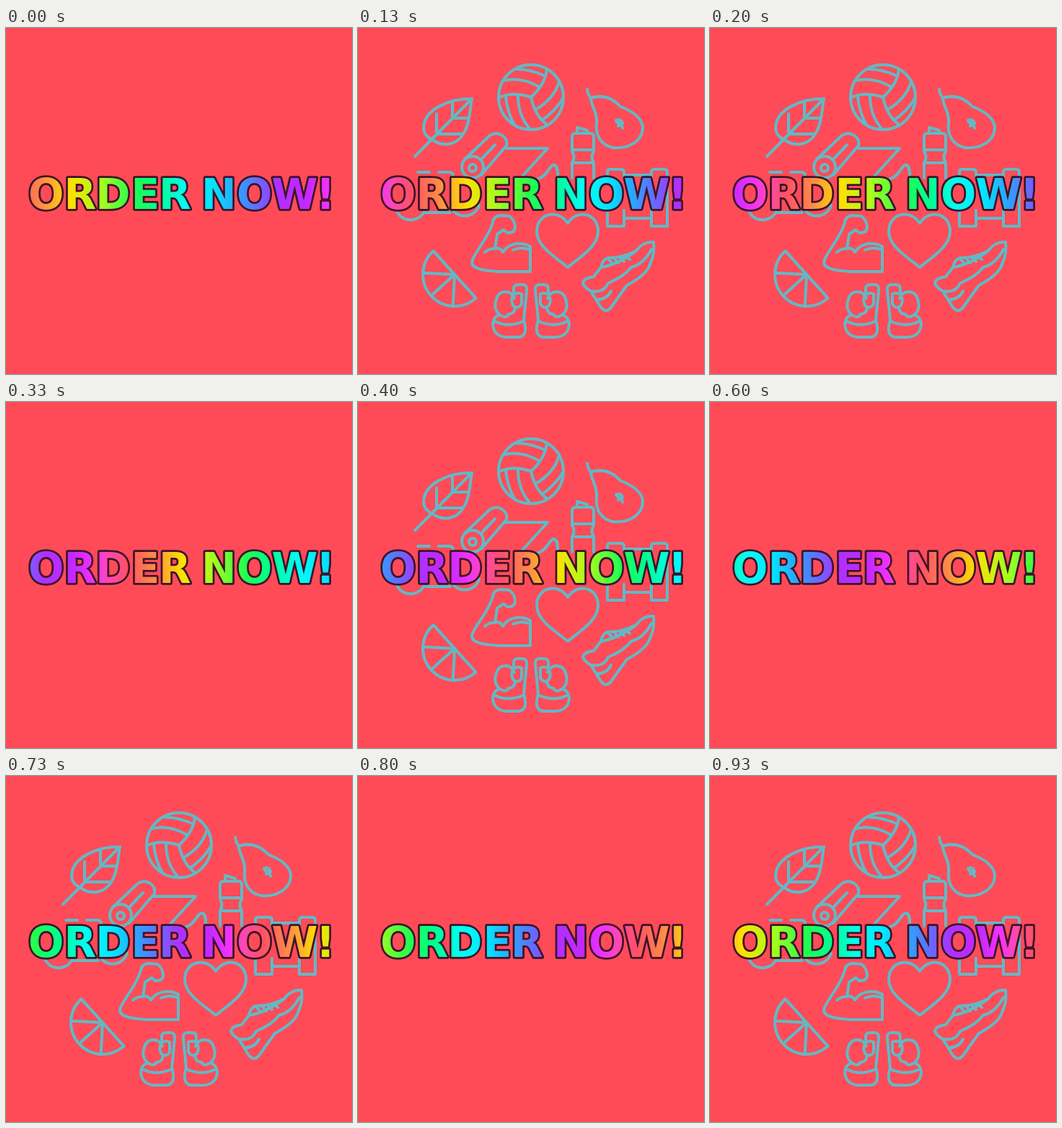
Recreate the animation shown at these times as an HTML page with a canvas. Size 480x480 px, loop 0.99 s.

```html
<!DOCTYPE html>
<html lang="en">
<head>
<meta charset="utf-8">
<title>Order now</title>
<style>
  html, body { margin: 0; width: 100%; height: 100%; overflow: hidden; background: #ff4b58; }
  canvas { display: block; width: 480px; height: 480px; }
</style>
</head>
<body>
<canvas id="stage" width="480" height="480"></canvas>
<script>
const ctx = document.getElementById('stage').getContext('2d');
const SIZE = 480;
const LOOP = 990;
const STEPS = 15;
const STEP_MS = 1000 / STEPS;
const BACKGROUND = '#ff4b58';
const TEAL = '#62b9c5';
const OUTLINE = '#3c1429';
const BASELINE = 250.6;

// Rainbow stops: position along one period of 480 px, colour.
const RAINBOW = [
  [0, '#ff5064'], [36, '#ff8848'], [76, '#ffe000'], [122, '#a0ff20'],
  [165, '#20ff50'], [200, '#00ff90'], [236, '#00fff0'], [272, '#00e8ff'],
  [305, '#28a8ff'], [338, '#6868ff'], [365, '#b030ff'], [405, '#c428ff'],
  [432, '#f030ff'], [455, '#ff48b0'], [480, '#ff5064']
];

// Centre of each letter.
const LETTERS = [
  ['O', 55.5], ['R', 105], ['D', 149.8], ['E', 194], ['R', 236.5],
  ['N', 295.5], ['O', 344.5], ['W', 400.5], ['!', 443.5]
];

const ICONS = {
  leaf: `M79 178 L157 99 M158 98 C126 98 92 113 91 138 Q91 149 103 155
    C119 166 137 162 146 147 C155 133 155 115 158 98
    M131 104 V125 H152 M109 147 V119 M109 147 H144`,
  pear: `M318 85 Q319 93 323 97 C340 92 354 98 364 109
    C382 116 395 126 395 139 C394 158 374 168 354 166
    C338 163 329 150 331 132 C333 118 323 108 323 97
    M358 128 Q366 126 367 133 Q360 134 358 128 M361 136 Q366 133 367 139`,
  mat: `M148 182 L182 150 C192 141 209 150 206 163 L171 204
    M144 193 a15 15 0 1 0 30 0 a15 15 0 1 0 -30 0
    M154 194 a5 5 0 1 0 10 0 a5 5 0 1 0 -10 0
    M203 167 H263 L222 212 M172 181 L190 162
    M250 209 C263 206 265 190 272 190 C278 192 277 202 277 209`,
  bottle: `M297 208 V187 Q302 179 297 171 V151 Q297 146 302 146 H322
    Q327 146 327 151 V171 Q322 179 327 187 V208
    M304 144 V138 L318 142 V145 M298 169 H326 M298 187 H326`,
  bike: `M52 246 A21 21 0 0 0 91 256 M128 246 A21 21 0 0 0 168 246
    M83 200 H99 M112 200 H127 Q132 200 132 206 M91 256 H128`,
  bench: `M346 208 V199 Q346 196 350 196 H365 Q369 196 369 200 V208
    M407 208 V200 Q407 196 411 196 H425 Q429 196 429 200 V275
    H407 V253 M346 253 V275 H369 V253 M369 204 H407 M369 264 H407`,
  arm: `M187 270 Q188 260 199 260 L210 261 Q218 267 218 277
    Q217 285 207 284 L202 280 L193 286 L190 306 Q197 304 201 311
    C207 300 224 295 239 303 V338 H195 C179 337 158 335 158 325
    C158 315 180 294 187 270 M190 306 Q181 306 176 311
    M215 308 Q226 303 237 307`,
  heart: `M291 271 C278 250 248 257 248 282 C248 303 273 317 291 332
    C309 317 333 303 333 282 C333 257 304 250 291 271 Z`,
  shoe: `M410 297 Q395 296 386 309 Q367 319 347 319 Q339 321 337 332
    L327 345 Q313 347 312 354 Q314 360 323 365 L336 386
    Q343 396 350 389 L373 357 Q401 342 405 328 Q412 314 410 297 Z
    M323 365 Q341 368 347 354 Q369 345 379 332 Q397 327 407 307
    M347 320 L353 327 M355 319 L361 326 M363 318 L369 324 M371 316 L377 321
    M337 332 Q358 329 385 310 M331 377 Q345 377 351 365`,
  glove: `M216 370 V362 Q216 356 222 356 H229 Q235 357 234 364 L230 405
    Q237 428 222 429 H205 Q188 427 187 411 Q188 400 197 398
    Q187 390 192 376 Q195 365 206 366 Q214 367 217 375
    M216 370 Q211 376 215 385 Q222 391 227 383 V369 Q221 366 216 370
    M197 398 Q205 404 209 397 Q217 397 218 388 M190 407 Q208 416 229 407`
};
for (const name in ICONS) ICONS[name] = new Path2D(ICONS[name]);

const ballSeams = new Path2D(
  'M0 0 Q20 -18 22 -39 M-38 -23 Q-14 -29 12 -14 M-22 -39 Q0 -39 20 -29');

function drawBall() {
  ctx.save();
  ctx.translate(240, 96);
  ctx.beginPath();
  ctx.arc(0, 0, 45, 0, Math.PI * 2);
  ctx.stroke();
  for (let i = 0; i < 3; i++) {
    ctx.stroke(ballSeams);
    ctx.rotate(Math.PI * 2 / 3);
  }
  ctx.restore();
}

function drawSlice() {
  const start = 48 * Math.PI / 180;
  ctx.save();
  ctx.translate(134, 342);
  ctx.rotate(start);
  ctx.beginPath();
  ctx.arc(0, 0, 44, 0, Math.PI);
  ctx.closePath();
  for (let i = 1; i < 4; i++) {
    const angle = i * Math.PI / 4;
    ctx.moveTo(0, 0);
    ctx.lineTo(44 * Math.cos(angle), 44 * Math.sin(angle));
  }
  ctx.stroke();
  ctx.restore();
}

function drawIcons() {
  ctx.strokeStyle = TEAL;
  ctx.lineWidth = 4;
  ctx.lineCap = ctx.lineJoin = 'round';
  drawBall();
  drawSlice();
  for (const name in ICONS) ctx.stroke(ICONS[name]);
  ctx.save();
  ctx.translate(SIZE, 0);
  ctx.scale(-1, 1);
  ctx.stroke(ICONS.glove);
  ctx.restore();
}

function rainbow(shift) {
  const gradient = ctx.createLinearGradient(shift - SIZE, 0, shift + SIZE, 0);
  for (let period = 0; period < 2; period++) {
    for (const [position, color] of RAINBOW) {
      gradient.addColorStop((period + position / SIZE) / 2, color);
    }
  }
  return gradient;
}

// Pen position that centres the visible ink of a letter on x.
function penX(letter, x) {
  const box = ctx.measureText(letter);
  return x - (box.actualBoundingBoxRight - box.actualBoundingBoxLeft) / 2;
}

function drawText(shift) {
  ctx.font = 'bold 58px "DejaVu Sans", sans-serif';
  ctx.textAlign = 'left';
  ctx.textBaseline = 'alphabetic';
  ctx.fillStyle = rainbow(shift);
  ctx.strokeStyle = OUTLINE;
  ctx.lineWidth = 5.4;
  ctx.lineJoin = 'round';
  for (const [letter, x] of LETTERS) ctx.strokeText(letter, penX(letter, x), BASELINE);
  for (const [letter, x] of LETTERS) ctx.fillText(letter, penX(letter, x), BASELINE);
}

function draw(now) {
  const time = now % LOOP;
  // Steps land on rounded hundredths of a second.
  let step = 0;
  while (step < STEPS - 1 && time >= Math.round((step + 1) * STEP_MS / 10) * 10) step++;
  ctx.fillStyle = BACKGROUND;
  ctx.fillRect(0, 0, SIZE, SIZE);
  if (step % 4 >= 2) drawIcons();
  drawText(12 + step * 31.2);
  requestAnimationFrame(() => draw(performance.now() - origin));
}

const origin = performance.now();
draw(0);
</script>
</body>
</html>
```
